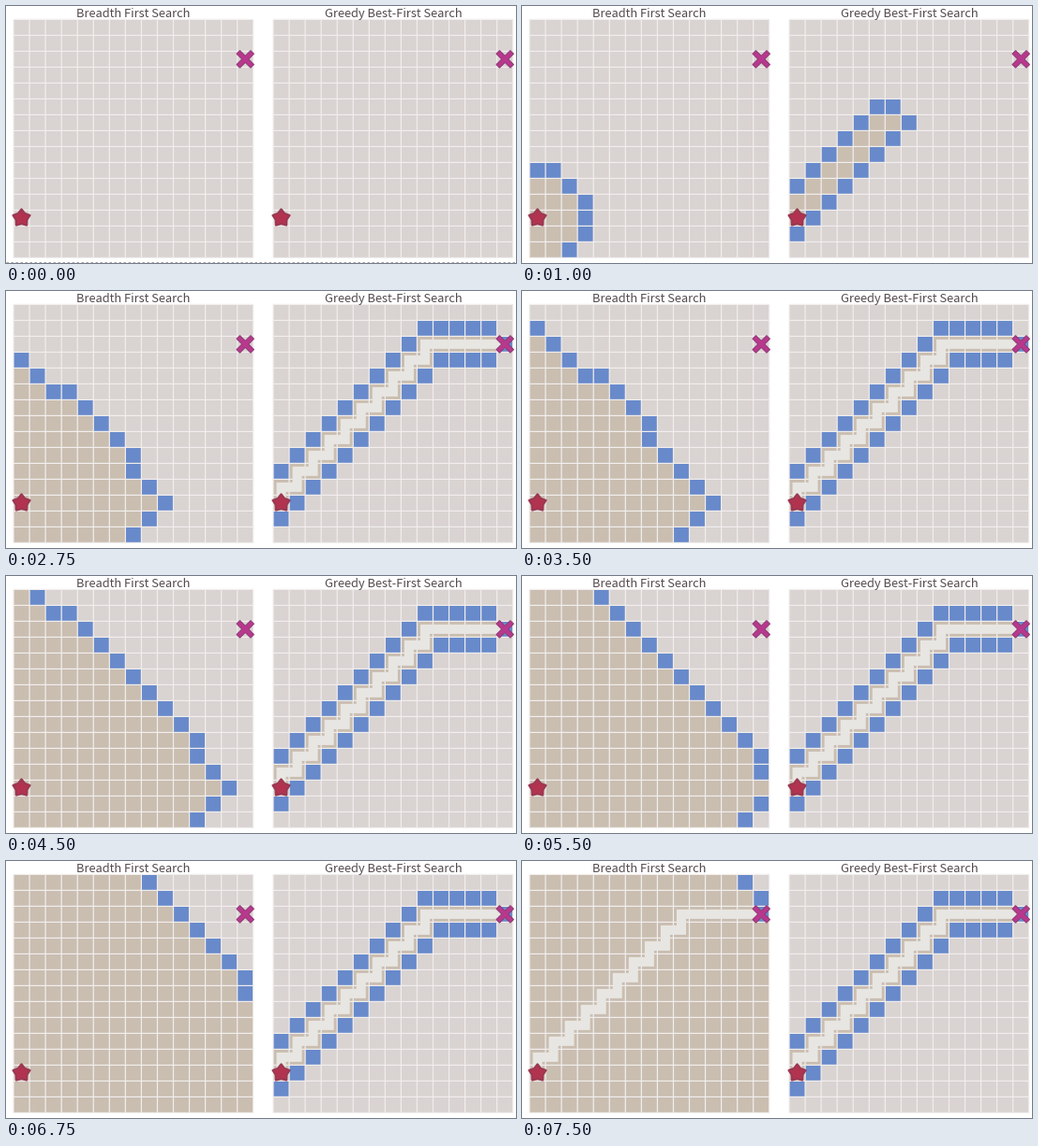
Recreate the animation shown at these times as a matplotlib script. Size 544 by 275 pixels, loop 8500 ms.

```python
import numpy as np
import matplotlib.pyplot as plt
from matplotlib.animation import FuncAnimation
from matplotlib.collections import LineCollection
from matplotlib.colors import ListedColormap
from matplotlib.patches import Polygon

W, H, DPI = 544, 275, 100
N, CELL_W, CELL_H, TOP = 15, 17.05, 17, 14.4
START, GOAL = (0, 12), (14, 2)
FRAMES, INTERVAL, DONE = 34, 250, 30
PX = 72 / DPI

INK = "#554a4e"
CMAP = ListedColormap(["#d9d3d2", "#cabeb1", "#688acb"])
UNSEEN, VISITED, FRONTIER = range(3)


def wave_key(cell):
    """Breadth-first layers, each spreading outward from its middle."""
    dx, dy = cell[0] - START[0], cell[1] - START[1]
    return abs(dx) + abs(dy), dx * dx + dy * dy, cell[0]


def staircase():
    """Shortest route: alternate up and right, then straight right."""
    x, y = START
    cells = [(x, y)]
    while (x, y) != GOAL:
        if y > GOAL[1] and (x + y - START[1]) % 2 == 0:
            y -= 1
        else:
            x += 1
        cells.append((x, y))
    return cells


ROUTE = staircase()
GREEDY_ORDER = ROUTE[:-1]
BREADTH_ORDER = sorted(((x, y) for x in range(N) for y in range(N)), key=wave_key)
BREADTH_ORDER = BREADTH_ORDER[:BREADTH_ORDER.index(GOAL)]


def expanded_count(k):
    """Cells expanded after k steps: a soft start, then a nearly even pace."""
    if k < 7:
        return int(round(33 * (k / 7) ** 1.63))
    return int(round(np.interp(k, [7, 14, 18, 22, 27, 30],
                               [33, 88, 122, 155, 196, 221])))


def grid_state(order, count):
    state = np.full((N, N), UNSEEN)
    visited = order[:count]
    for x, y in visited:
        for dx, dy in ((1, 0), (-1, 0), (0, 1), (0, -1)):
            nx, ny = x + dx, y + dy
            if 0 <= nx < N and 0 <= ny < N:
                state[ny, nx] = FRONTIER
    for x, y in visited:
        state[y, x] = VISITED
    return state


def star_points(center, outer=9.6, inner=6.2):
    angles = -np.pi / 2 + np.arange(10) * np.pi / 5
    radii = np.where(np.arange(10) % 2, inner, outer)
    return np.column_stack([center[0] + radii * np.cos(angles),
                            center[1] + radii * np.sin(angles)])


def cross_points(center, length=10.6, half=2.5):
    arm = np.array([[length, -half], [length, half], [half, half]])
    points = []
    for turn in np.pi / 4 + np.arange(4) * np.pi / 2:
        c, s = np.cos(turn), np.sin(turn)
        points.extend(arm @ np.array([[c, s], [-s, c]]))
    return np.array(points) + center


class Panel:
    def __init__(self, ax, left, title, order):
        self.order = order
        xs = left + np.arange(N + 1) * CELL_W
        ys = TOP + np.arange(N + 1) * CELL_H
        self.mesh = ax.pcolormesh(xs, ys, np.zeros((N, N)), cmap=CMAP,
                                  vmin=-0.5, vmax=2.5, antialiased=True,
                                  snap=False)
        lines = [[(x, ys[0]), (x, ys[-1])] for x in xs]
        lines += [[(xs[0], y), (xs[-1], y)] for y in ys]
        grid = LineCollection(lines, colors="#f1eeed", linewidths=1.2 * PX,
                              zorder=2)
        grid.set_snap(False)
        ax.add_collection(grid)

        def center(cell):
            return np.array([left + (cell[0] + 0.5) * CELL_W,
                             TOP + (cell[1] + 0.5) * CELL_H])

        points = np.array([center(c) for c in ROUTE])
        self.route, = ax.plot(points[:, 0], points[:, 1], color="#e8e6e2",
                              lw=10 * PX, solid_joinstyle="miter",
                              solid_capstyle="butt", snap=False, zorder=3)
        ax.add_patch(Polygon(star_points(center(START)),
                             fc="#b2334f", ec="#9a3852", lw=2 * PX,
                             joinstyle="round", zorder=4))
        ax.add_patch(Polygon(cross_points(center(GOAL)),
                             fc="#b8388e", ec="#8e3a73", lw=1 * PX,
                             joinstyle="miter", zorder=4))
        ax.text(left + N * CELL_W / 2, 12, title, ha="center", va="baseline",
                fontsize=12.9 * PX, family="Noto Sans CJK JP", color=INK)

    def show(self, count, solved):
        self.mesh.set_array(grid_state(self.order, count))
        self.route.set_visible(solved)


fig = plt.figure(figsize=(W / DPI, H / DPI), dpi=DPI, facecolor="white")
ax = fig.add_axes([0, 0, 1, 1])
ax.set_xlim(0, W)
ax.set_ylim(H, 0)
ax.axis("off")

breadth = Panel(ax, 8, "Breadth First Search", BREADTH_ORDER)
greedy = Panel(ax, 285, "Greedy Best-First Search", GREEDY_ORDER)
rule, = ax.plot([0, W], [273.5, 273.5], color="#a9a5a6", lw=1 * PX,
                dashes=(2.5, 2.5))


def update(frame):
    k = min(frame, DONE)
    count = expanded_count(k)
    breadth.show(count, k == DONE)
    greedy.show(count, count >= len(GREEDY_ORDER))
    rule.set_visible(frame == 0)
    return breadth.mesh, breadth.route, greedy.mesh, greedy.route, rule


anim = FuncAnimation(fig, update, frames=FRAMES, interval=INTERVAL,
                     repeat=True, repeat_delay=0, blit=False)
plt.show()
```
